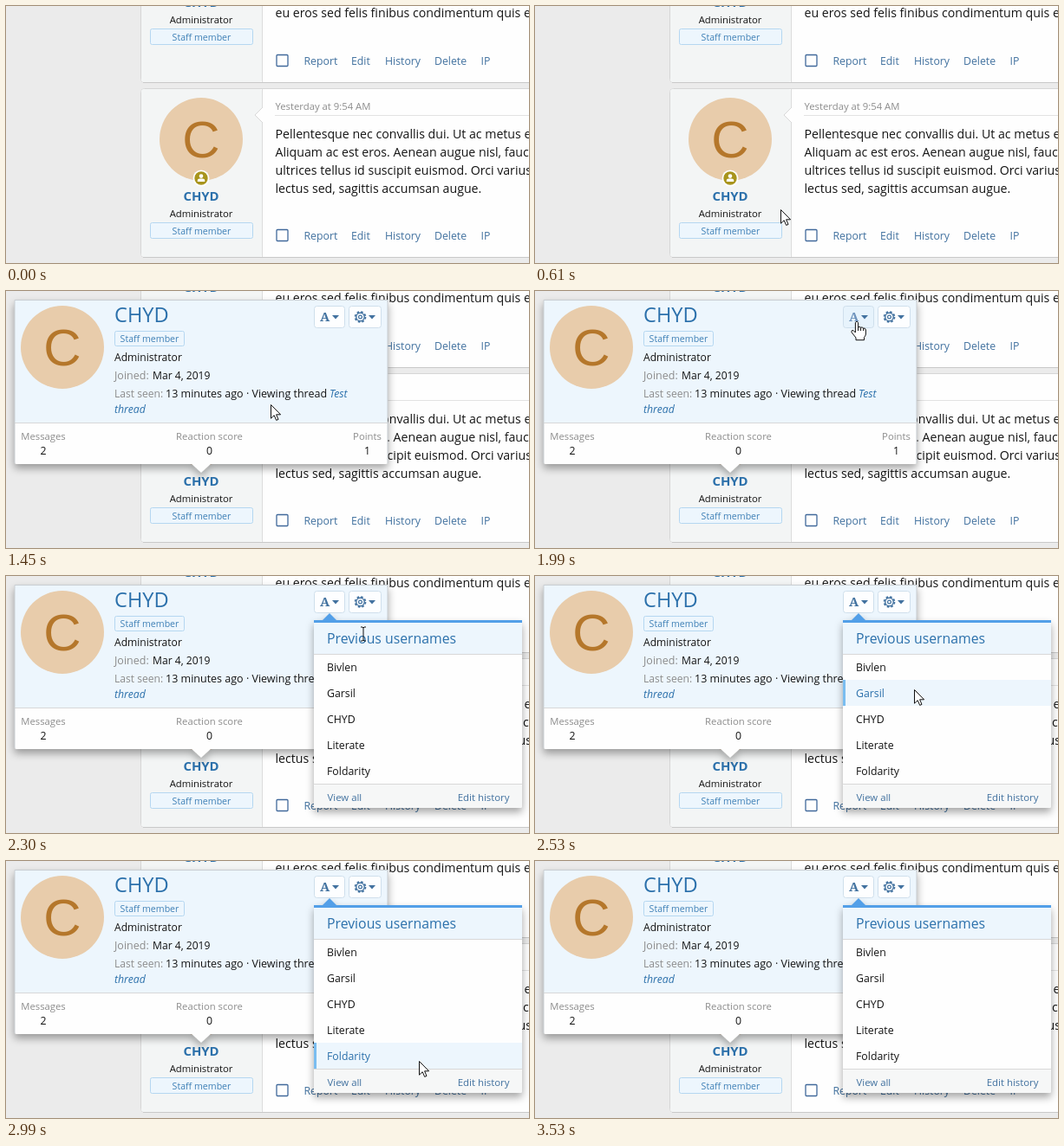
Write an HTML page that moves like this. It is 603 px wide and 297 px high and loops after 4460 ms.

```html
<!DOCTYPE html>
<html lang="en">
<head>
<meta charset="utf-8">
<title>Member card</title>
<style>
html, body { margin: 0; width: 100%; height: 100%; overflow: hidden; background: #ebebeb; }
svg { display: block; width: 603px; height: 297px; font-family: "Open Sans", "Noto Sans", sans-serif; }
.floating { filter: drop-shadow(0 5px 5px rgba(0, 0, 0, .35)); }
.hover rect { fill: #e7f3fc; }
.hover text { fill: #6d92bc; }
#name.hover { fill: #204d74; text-decoration: underline; }
</style>
</head>
<body>
<svg id="stage" viewBox="0 0 603 297"></svg>
<script>
const LOOP = 4460, TICK = 230 / 3;
const INK = '#141414', MUTED = '#8c8c8c', LINK = '#2b70ab', ACTION = '#41719f', ACCENT = '#529fe8';
const USER = 'CHYD';
const PREVIOUS = ['Bivlen', 'Garsil', USER, 'Literate', 'Foldarity'];

const text = (x, y, size, fill, str, extra = '') =>
  `<text x="${x}" y="${y}" font-size="${size}" fill="${fill}" ${extra}>${str}</text>`;
const centered = (x, y, size, fill, str, extra = '') =>
  text(x, y, size, fill, str, 'text-anchor="middle" ' + extra);
const rect = (x, y, w, h, fill, extra = '') =>
  `<rect x="${x}" y="${y}" width="${w}" height="${h}" fill="${fill}" ${extra}/>`;
const path = (d, fill, extra = '') => `<path d="${d}" fill="${fill}" ${extra}/>`;

const avatar = (x, y) => `<circle cx="${x}" cy="${y}" r="48" fill="#e8ccab"/>` +
  centered(x, y + 21, 60, '#b5772b', USER[0], 'font-family="Liberation Sans, sans-serif"');

const badge = (x, y, w, h) =>
  rect(x + .5, y + .5, w - 1, h - 1, '#edf6fd', 'rx="2" stroke="#b5d7f1"') +
  centered(x + w / 2, y + h / 2 + 4, 10.6, '#3f80b6', 'Staff member');

const userInfo = (y, id) =>
  centered(225, y, 14.9, LINK, USER, `font-weight="700" ${id}`) +
  centered(225, y + 19, 11.3, INK, 'Administrator') + badge(166, y + 25, 119, 19);

const postBox = (y, h) =>
  rect(155.5, y + .5, 470, h - 1, '#fefefe', 'rx="4" stroke="#d6d6d6"') +
  rect(156, y + 1, 139, h - 2, '#f3f5f5', 'rx="3"') +
  path(`M295.5 ${y + 1}v${h - 2}`, 'none', 'stroke="#dcdcdc"') +
  path(`M158 ${y + h - .5}H603`, 'none', 'stroke="#c9c9c9"');

const actions = y =>
  rect(312, y - 11.5, 13, 13, '#fefefe', 'rx="1" stroke="#41699b" stroke-width="1.3"') +
  [[343.5, 'Report'], [398, 'Edit'], [437, 'History'], [494, 'Delete'], [547.5, 'IP']]
    .map(([x, label]) => text(x, y, 12.3, ACTION, label)).join('');

const paragraph = (y, lines) =>
  lines.map((line, i) => text(310.5, y + 21 * i, 14.17, INK, line)).join('');

const posts = postBox(-40, 129) + userInfo(1, '') +
  paragraph(13, ['eu eros sed felis finibus condimentum quis et']) + actions(68) +
  postBox(95, 196) + avatar(225, 154) + userInfo(225, 'id="name"') +
  `<circle cx="225" cy="199" r="9.5" fill="#fdfdfd"/><circle id="status" cx="225" cy="199" r="7.7"/>
   <circle cx="225" cy="196.6" r="2.3" fill="#fff"/>` +
  path('M220.8 203v-1q0-2.4 2.6-2.4h3.2q2.6 0 2.6 2.4v1z', '#fff') +
  path('M296 117l-9 9 9 9', '#fefefe', 'stroke="#d8d8d8"') +
  text(310.5, 120, 11.3, MUTED, 'Yesterday at 9:54 AM') +
  path('M310 126.5H603', 'none', 'stroke="#e2e2e2"') +
  paragraph(153, [
    'Pellentesque nec convallis dui. Ut ac metus et',
    'Aliquam ac est eros. Aenean augue nisl, faucibus',
    'ultrices tellus id suscipit euismod. Orci varius et',
    'lectus sed, sagittis accumsan augue.']) + actions(270);

const button = (x, w, icon, id) => `<g id="${id}">` +
  rect(x + .5, 17.5, w - 1, 25, '#fdfeff', 'rx="3" stroke="#cfdfec"') + icon +
  path(`M${x + w - 15} 28h8l-4 4.5z`, ACTION) + '</g>';

const gear = `<g fill="none" stroke="${ACTION}"><circle cx="408.5" cy="30" r="4.7" stroke-width="1.4"/>
  <circle cx="408.5" cy="30" r="6" stroke-width="1.7" stroke-dasharray="2.6 2.11"/>
  <circle cx="408.5" cy="30" r="1.9" stroke-width="1.2"/></g>`;

const stat = (x, label, value) =>
  centered(x, 172, 11.3, MUTED, label) + centered(x, 189, 12.3, INK, value);

const card = rect(10, 10, 430, 190, '#fefefe', 'rx="2"') + path('M213 199h24l-12 11z', '#fefefe') +
  rect(10, 10, 430, 142, '#edf6fd', 'rx="2"') +
  path('M10 152.5H440', 'none', 'stroke="#d8d8d8"') +
  path('M10 199V10.5H440V199', 'none', 'stroke="#c9ced2"') +
  avatar(65, 65) + text(125, 36, 23.6, LINK, USER) + badge(125, 46, 81, 18) +
  text(125, 81, 12.1, INK, 'Administrator') +
  text(125, 102, 12.5, MUTED, 'Joined:') + text(169, 102, 12.1, INK, 'Mar 4, 2019') +
  text(125, 123, 12.1, MUTED, 'Last seen:') +
  text(184, 123, 12.5, INK, '13 minutes ago · Viewing thread') +
  text(373, 123, 12.3, LINK, 'Test', 'font-style="italic"') +
  text(125, 141, 12.3, LINK, 'thread', 'font-style="italic"') +
  stat(43, 'Messages', 2) + stat(234.5, 'Reaction score', 0) + stat(416.5, 'Points', 1) +
  button(355, 36, text(362, 35, 15, ACTION, 'A', 'font-family="Noto Serif, serif" font-weight="600"'), 'history') +
  button(395, 38, gear, 'settings');

const menu = path('M364 52l9-9 9 9z', ACCENT) + rect(355, 51, 240, 217, '#fefefe', 'rx="2"') +
  rect(355, 54, 240, 36, '#edf6fd') + rect(355, 51, 240, 3, ACCENT) +
  path('M355 90.5H595', 'none', 'stroke="#d8d8d8"') +
  text(370, 78, 15.8, LINK, 'Previous usernames') +
  `<g id="rowHover">${rect(355, 0, 240, 30, '#edf6fd')}${rect(355, 0, 3, 30, '#7abdf0')}</g>` +
  PREVIOUS.map((name, i) => text(370, 110 + 30 * i, 12.3, INK, name, 'class="row"')).join('') +
  rect(355, 241, 240, 27, '#f6f7f7', 'rx="2"') + path('M355 240.5H595', 'none', 'stroke="#d8d8d8"') +
  text(370.5, 260, 11.4, ACTION, 'View all') +
  text(580.5, 260, 11.4, ACTION, 'Edit history', 'text-anchor="end"');

const outline = 'stroke="#111" stroke-linejoin="round"';
const cursors = {
  arrow: path('M.5.5V16.2L4.2 12.7 6.7 18.4 9 17.4 6.6 11.8H11.6Z', '#fff', outline),
  hand: path('M-1.6 1.3Q0-.8 1.6 1.3V7Q3 5.6 4.6 7.2Q6 6.2 7.6 8Q10 7.5 10.4 10V15Q10 17 8.5 18.5V21.7H-1V19' +
    'L-6 12.7Q-6.5 10-4 10.5L-1.6 13ZM1.6 7V11M4.6 7.3V11M7.6 8V11', '#fff', outline),
  beam: path('M-3-8H-1L0-7 1-8H3M0-7V7M-3 8H-1L0 7 1 8H3', 'none', 'stroke="#111"')
};

const $ = id => document.getElementById(id);
$('stage').innerHTML = posts + `<g id="card" class="floating">${card}</g><g id="menu" class="floating">${menu}</g>` +
  '<g id="cursor">' + Object.entries(cursors).map(([id, shape]) => `<g id="${id}">${shape}</g>`).join('') + '</g>';
const rows = document.querySelectorAll('.row');

// Pointer stops: tick, x, y
const STOPS = [[12, 231, 216], [14, 231, 216], [19, 305, 131], [20, 321, 114], [24, 371, 35], [26, 371, 35],
  [30, 412, 67], [34, 445, 152], [36, 463, 184], [41, 485, 263], [45, 520, 290], [46, 529, 310]];

const clamp = v => Math.min(1, Math.max(0, v));
const show = (id, on) => $(id).style.display = on ? '' : 'none';

function pointer(tick) {
  if (tick < 12) {
    const left = ((12 - tick) / 9) ** 1.7;
    return [231 + 206 * left, 216 + 75 * left];
  }
  const next = STOPS.findIndex(stop => stop[0] > tick);
  if (next < 0) return [0, 400];
  const [t0, x0, y0] = STOPS[next - 1], [t1, x1, y1] = STOPS[next];
  const p = (tick - t0) / (t1 - t0);
  return [x0 + (x1 - x0) * p, y0 + (y1 - y0) * p];
}

function draw(now) {
  // The screen refreshes 13 times a second, so motion advances in whole ticks.
  const tick = Math.floor((now % LOOP + 8) / TICK);
  const [x, y] = pointer(tick).map(Math.round);
  const onName = tick >= 11 && tick <= 15, onButton = tick >= 23 && tick <= 26;
  const shape = onName || onButton ? 'hand' : tick === 30 ? 'beam' : 'arrow';

  show('cursor', tick >= 3 && tick < 46);
  $('cursor').setAttribute('transform', `translate(${x} ${y})`);
  Object.keys(cursors).forEach(id => show(id, id === shape));

  $('name').classList.toggle('hover', onName);
  $('history').classList.toggle('hover', onButton);
  $('status').setAttribute('fill', tick < 14 ? '#a8941c' : '#63b02b');
  $('card').style.opacity = clamp((tick - 13.87) / 3.3);
  $('menu').style.opacity = clamp((tick - 26.8) / 3);

  const row = tick > 30 ? Math.floor((y - 90) / 30) : -1;
  show('rowHover', row >= 0 && row < rows.length);
  $('rowHover').setAttribute('transform', `translate(0 ${90 + 30 * row})`);
  rows.forEach((label, i) => label.setAttribute('fill', i === row ? LINK : INK));
}

const start = performance.now();
function loop() {
  draw(performance.now() - start);
  requestAnimationFrame(loop);
}
loop();
</script>
</body>
</html>
```
